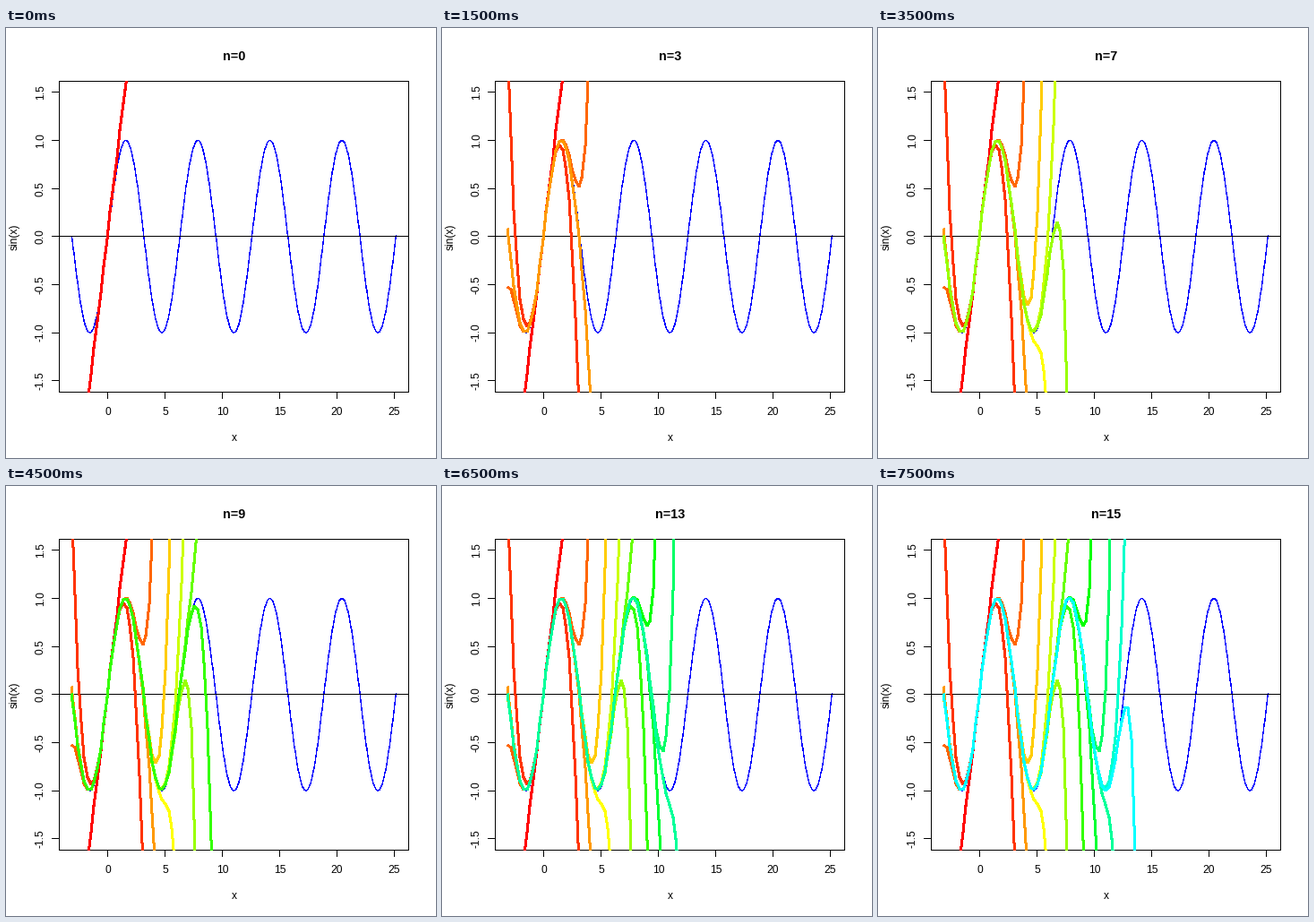
These frames come from a looping animation (480 px wide and 480 px high, 8 s). A matplotlib script:

```python
import colorsys
import math

import matplotlib.pyplot as plt
import numpy as np
from matplotlib.animation import FuncAnimation
from matplotlib.patches import Rectangle

plt.rcParams["font.family"] = "Liberation Sans"
plt.rcParams["path.simplify"] = False

SIZE, DPI = 480, 96
PT = 72 / DPI                      # points per pixel
LINE = 14.4                        # height of one margin line in pixels
TERMS = 16

LEFT, RIGHT = 4.1 * LINE, SIZE - 2.1 * LINE
TOP, BOTTOM = 4.1 * LINE, SIZE - 5.1 * LINE
X0, X1 = -math.pi, 8 * math.pi
Y0, Y1 = -1.5, 1.5
PAD = 0.04


def to_px(x):
    span = X1 - X0
    return LEFT + (x - X0 + PAD * span) / (span * (1 + 2 * PAD)) * (RIGHT - LEFT)


def to_py(y):
    span = Y1 - Y0
    return BOTTOM - (y - Y0 + PAD * span) / (span * (1 + 2 * PAD)) * (BOTTOM - TOP)


fig = plt.figure(figsize=(SIZE / DPI, SIZE / DPI), dpi=DPI, facecolor="white")
ax = fig.add_axes([0, 0, 1, 1])
ax.set_xlim(0, SIZE)
ax.set_ylim(SIZE, 0)
ax.axis("off")

left, right, top, bottom = (math.floor(v) for v in (LEFT, RIGHT, TOP, BOTTOM))
panel = Rectangle((left, top), right - left + 1, bottom - top + 1,
                  transform=ax.transData)


def stroke(px, py, color, width=1, z=1, cap="projecting"):
    """Draw a hard-edged line through whole-pixel vertices."""
    shift = 0.5 if width % 2 else 0
    line, = ax.plot(np.floor(px) + shift, np.floor(py) + shift, color=color,
                    lw=width * PT, zorder=z, antialiased=False, snap=False,
                    solid_capstyle=cap, solid_joinstyle="round")
    return line


def label(x, y, text, size=12, **kw):
    return ax.text(x, y, text, fontsize=size * PT, ha="center", va="baseline",
                   rotation_mode="anchor", color="black", **kw)


# Frame, ticks and labels
stroke([LEFT, RIGHT, RIGHT, LEFT, LEFT], [TOP, TOP, BOTTOM, BOTTOM, TOP], "black")
for v in range(0, 26, 5):
    x = to_px(v)
    stroke([x, x], [BOTTOM, BOTTOM + LINE / 2], "black", cap="butt")
    label(x, BOTTOM + 1.8 * LINE, str(v))
for v in np.arange(-1.5, 1.6, 0.5):
    y = to_py(v)
    stroke([LEFT - LINE / 2, LEFT], [y, y], "black", cap="butt")
    label(LEFT - 1.2 * LINE, y, f"{v:.1f}", rotation=90)
label((LEFT + RIGHT) / 2, BOTTOM + 3.8 * LINE, "x")
label(LEFT - 3.2 * LINE, (TOP + BOTTOM) / 2, "sin(x)", rotation=90)
title = label((LEFT + RIGHT) / 2, 36, "n=0", size=14.4, weight="bold")

# Sine wave and zero line
xs = np.linspace(X0, X1, 1000)
stroke(to_px(xs), to_py(np.sin(xs)), "#0000ff", z=2)
stroke([LEFT, RIGHT], [to_py(0)] * 2, "black", z=3)

# Taylor polynomials, each with one more term
xs = np.linspace(X0, X1, 101)
total = np.zeros_like(xs)
curves = []
for n in range(TERMS):
    k = 2 * n + 1
    total = total + (-1) ** n * xs ** k / math.factorial(k)
    curve = stroke(to_px(xs), to_py(total), colorsys.hsv_to_rgb(n / 30, 1, 1),
                   width=2, z=4 + n, cap="butt")
    curve.set_clip_path(panel)
    curves.append(curve)


def update(i):
    title.set_text(f"n={i}")
    for n, curve in enumerate(curves):
        curve.set_visible(n <= i)
    return [title, *curves]


anim = FuncAnimation(fig, update, frames=TERMS, interval=500, repeat=True,
                     repeat_delay=0, blit=False)
plt.show()
```
